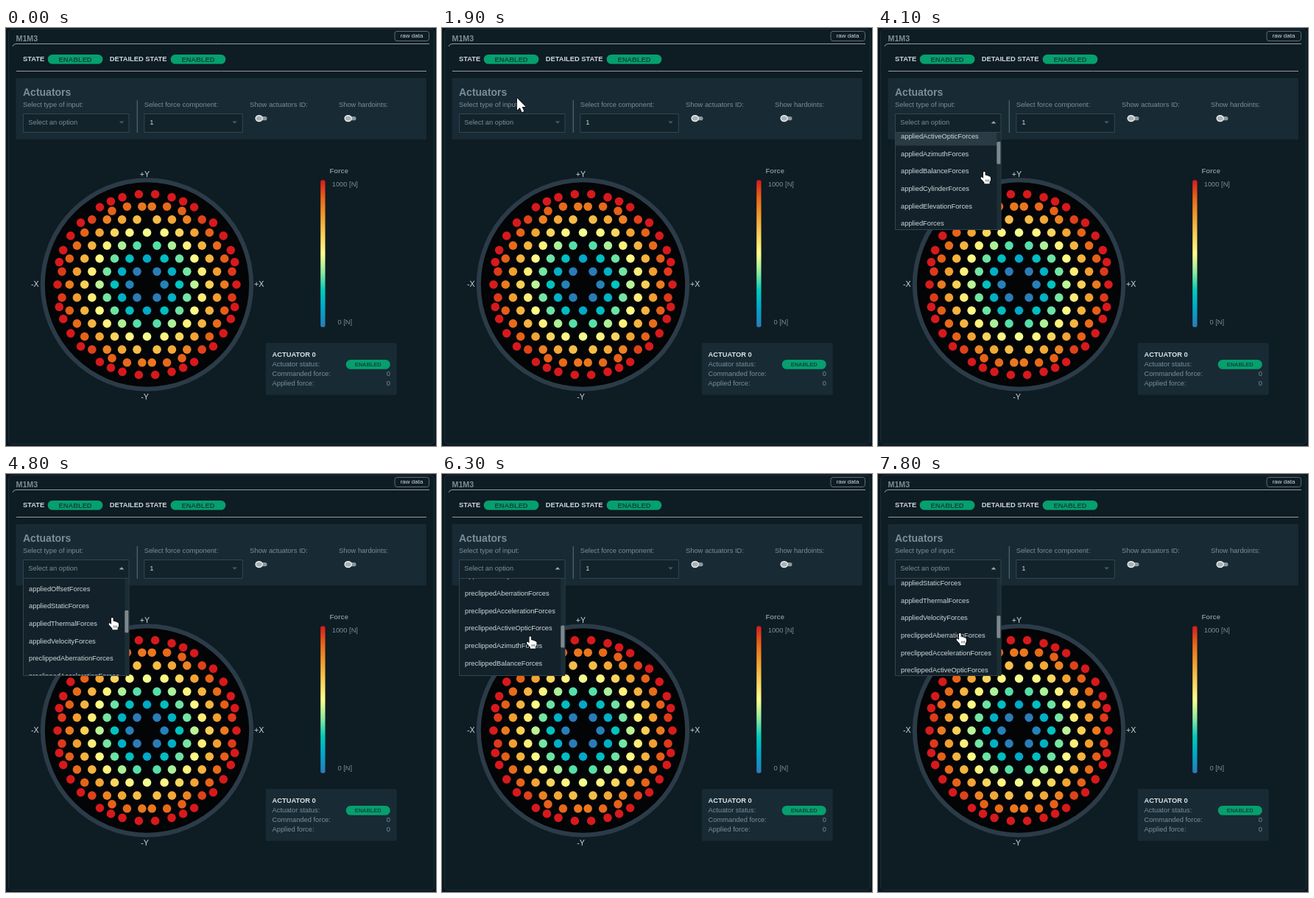
An HTML page with a canvas for the animation above (8 s loop, 584x567 px).

```html
<!DOCTYPE html>
<html lang="en">
<head>
<meta charset="utf-8">
<title>Actuators</title>
<style>
  html, body { margin: 0; width: 100%; height: 100%; overflow: hidden; background: #0b171e; }
  canvas { display: block; }
</style>
</head>
<body>
<canvas id="stage" width="584" height="567"></canvas>
<script>
const ctx = document.getElementById('stage').getContext('2d');
const LOOP = 8000, STEP = 100;
const OPEN_AT = 2400, HAND_AT = 2000, ARROW_AT = 500;
const FONT = '"Liberation Sans", Arial, sans-serif';
const GREY = '#7b8e98', LIGHT = '#ced7db', GREEN = '#05a06d';
const PANEL = '#182b35', FIELD = '#13232b', RULE = '#929ca1';
const SCALE = ['#2c7bb6', '#00a6ca', '#00ccbc', '#90eb9d', '#ffff8c',
               '#f9d057', '#f29e2e', '#e76818', '#d7191c'];

const LIST = { x: 23.5, y: 141.5, w: 143.5, h: 132, row: 23.67 };
const KINDS = ['Aberration', 'Acceleration', 'ActiveOptic', 'Azimuth', 'Balance', 'Cylinder',
               'Elevation', '', 'Offset', 'Static', 'Thermal', 'Velocity'];
const OPTIONS = ['applied', 'preclipped'].flatMap(p => KINDS.map(k => p + k + 'Forces'));

// Stops: arrival time, then values
const ARROW_STOPS = [[500, 458, 96], [1300, 177, 36], [1700, 91, 41], [1900, 102, 95]];
// x, y, highlighted row
const HAND_STOPS = [[2000, 112, 115, 0], [2200, 112, 127, 0], [3100, 134, 153, 0],
                    [3700, 139, 194, 2], [5600, 117, 206, 2], [6500, 112, 233, 17],
                    [6800, 109, 253, 18], [7500, 106, 215, 16]];
const SCROLL_STOPS = [[0, 0], [4100, 53], [4600, 153], [5000, 253.5], [6500, 317.6], [7800, 218]];

// Rest at each stop, then travel to arrive at the next one on time
function glide(stops, travel, t) {
  const next = stops.findIndex(s => s[0] > t);
  if (next < 0) return stops[stops.length - 1].slice(1);
  const a = stops[next - 1], b = stops[next];
  const from = Math.max(a[0], b[0] - travel);
  const k = Math.max(0, (t - from) / (b[0] - from));
  return a.slice(1).map((v, i) => v + (b[i + 1] - v) * k);
}

function text(str, x, y, color = GREY, size = 9.33, weight = 'normal', align = 'left') {
  ctx.font = `${weight} ${size}px ${FONT}`;
  ctx.textAlign = align;
  ctx.fillStyle = color;
  ctx.fillText(str, x, y);
}

function box(x, y, w, h, r, fill, stroke) {
  ctx.beginPath();
  ctx.roundRect(x, y, w, h, r);
  if (fill) { ctx.fillStyle = fill; ctx.fill(); }
  if (stroke) { ctx.strokeStyle = stroke; ctx.lineWidth = 1; ctx.stroke(); }
}

function oval(x, y, rx, ry, fill) {
  ctx.beginPath();
  ctx.ellipse(x, y, rx, ry, 0, 0, 2 * Math.PI);
  ctx.fillStyle = fill;
  ctx.fill();
}

function strokePath(d, color, width = 1) {
  ctx.strokeStyle = color;
  ctx.lineWidth = width;
  ctx.stroke(new Path2D(d));
}

function heat(f) {
  const p = Math.min(Math.max(f, 0), 1) * (SCALE.length - 1);
  const i = Math.min(Math.floor(p), SCALE.length - 2);
  const rgb = s => [1, 3, 5].map(n => parseInt(s.slice(n, n + 2), 16));
  const a = rgb(SCALE[i]), b = rgb(SCALE[i + 1]);
  return `rgb(${a.map((v, j) => Math.round(v + (b[j] - v) * (p - i)))})`;
}

// One quadrant: a staggered grid, a bent top row and an outer rim
function quadrant() {
  const dx = 20.4, dy = 17.63, limit = 117, points = [[121.5, 0], [0, 2 * dy], [0, 4 * dy]];
  for (let n = 0; n < 6; n++)
    for (let x = n % 2 ? 13.5 : 23.6; Math.hypot(x, n * dy) < limit; x += dx)
      points.push([x, n * dy]);
  for (let k = 0; k < 3; k++) {
    const x = 6.7 + k * dx;
    points.push([x, Math.min(6 * dy, Math.sqrt(110.6 ** 2 - x * x))]);
  }
  for (const deg of [14.3, 22.3, 32.5, 43, 58.6, 66.5, 74.2, 84.8]) {
    const a = deg * Math.PI / 180;
    points.push([123 * Math.cos(a), 123 * Math.sin(a)]);
  }
  return points;
}
const ACTUATORS = quadrant();

function mirror() {
  const cx = 191.5, cy = 348;
  oval(cx, cy, 144.7, 144.7, '#2b3b48');
  oval(cx, cy, 138.7, 138.7, '#020406');
  for (const [x, y] of ACTUATORS) {
    const color = heat((Math.hypot(x, y) - 22) / 100);
    for (const sx of x ? [-1, 1] : [1])
      for (const sy of y ? [-1, 1] : [1]) oval(cx + sx * x, cy + sy * y, 5.8, 5.8, color);
  }
  text('+Y', 188.5, 202, LIGHT, 10.67, 'normal', 'center');
  text('-Y', 188.5, 504, LIGHT, 10.67, 'normal', 'center');
  text('-X', 34, 351, LIGHT, 10.67);
  text('+X', 337, 351, LIGHT, 10.67);
}

function legend() {
  const g = ctx.createLinearGradient(0, 406, 0, 206);
  SCALE.forEach((c, i) => g.addColorStop(i / (SCALE.length - 1), c));
  box(427.2, 206.3, 6.3, 199.5, 2.5, g);
  text('Force', 439.5, 197, GREY, 9.33, 'bold');
  text('1000 [N]', 442.7, 215);
  text('0 [N]', 450.5, 402);
}

function badge(x, y, w, size) {
  box(x, y, w, 12.8, 6.4, GREEN);
  text('ENABLED', x + w / 2, y + 6.2 + size * 0.36, '#124540', size, 'bold', 'center');
}

function toggle(x) {
  box(x, 120, 15.5, 5.3, 2.6, '#8d979d');
  oval(x + 4.7, 122.6, 4.6, 3.9, '#a9b2b7');
  ctx.strokeStyle = '#edf0f1';
  ctx.lineWidth = 1.4;
  ctx.stroke();
}

function caret(x, up, color) {
  const s = up ? -1 : 1;
  ctx.fillStyle = color;
  ctx.fill(new Path2D(`M${x - 3.3} ${128 - 1.6 * s}h6.6l-3.3 ${3.4 * s}z`));
}

function header() {
  box(3.5, 1.5, 578, 563, 5, '#0e1c24', '#1c2e38');
  text('M1M3', 13.5, 18, GREY, 10.67, 'bold');
  strokePath('M9 25Q10 21.5 14 21.5H575', RULE);
  box(528, 4.5, 46.5, 13, 3, '#0e1c24', '#5f6e77');
  text('raw data', 551, 13, '#d5dcdf', 8, 'normal', 'center');
  text('STATE', 23, 45, LIGHT, 9.33, 'bold');
  badge(56.7, 36, 74.7, 9.33);
  text('DETAILED STATE', 140.7, 45, LIGHT, 9.33, 'bold');
  badge(223.6, 36, 74.7, 9.33);
  strokePath('M14 58.5H571', RULE);
}

function controls(open) {
  box(13.5, 68, 557.3, 83.3, 2, PANEL);
  text('Actuators', 23, 92, GREY, 14, 'bold');
  text('Select type of input:', 23, 107);
  text('Select force component:', 187.7, 107);
  text('Show actuators ID:', 331, 107);
  text('Show hardoints:', 452, 107);
  box(23.5, 116.5, 143.5, 25, 0, FIELD, '#34454f');
  box(187.8, 116.5, 133.5, 25, 0, FIELD, '#34454f');
  text('Select an option', 30.3, 131);
  text('1', 195.3, 131, LIGHT);
  caret(157, open, open ? '#a3adb2' : '#4b5a63');
  caret(310.5, false, '#4b5a63');
  strokePath('M178.3 98V142', '#52616a', 1.3);
  toggle(339);
  toggle(460);
}

function card() {
  box(352.7, 427.3, 178, 70.5, 2, PANEL);
  text('ACTUATOR 0', 361.5, 446, '#dbe2e5', 9.33, 'bold');
  badge(461.7, 450, 60, 7.45);
  ['Actuator status:', 'Commanded force:', 'Applied force:'].forEach((label, i) => {
    const y = 459 + 13 * i;
    text(label, 361.5, y);
    if (i) text('0', 522, y, GREY, 9.33, 'normal', 'right');
  });
}

function dropdown(t, active) {
  const { x, y, w, h, row } = LIST;
  const [scroll] = glide(SCROLL_STOPS, 300, t);
  const ratio = (h - 1) / (OPTIONS.length * row);
  ctx.save();
  if (t < OPEN_AT + STEP) {
    ctx.globalAlpha = 0.6;
    ctx.translate(0, y * 0.1);
    ctx.scale(1, 0.9);
  }
  box(x, y, w, h, 0, '#13222a', '#33444d');
  ctx.beginPath();
  ctx.rect(x + 0.5, y + 0.5, w - 1, h - 1);
  ctx.clip();
  OPTIONS.forEach((name, i) => {
    const top = y + i * row - scroll;
    if (i === active) {
      ctx.fillStyle = '#2a3b45';
      ctx.fillRect(x, top, w, row);
    }
    text(name, 31, Math.floor(top + 14.8), LIGHT);
  });
  ctx.fillStyle = '#1c2d36';
  ctx.fillRect(161.3, y, 6, h);
  box(161.3, y + 0.5 + scroll * ratio, 5.4, (h - 1) * ratio, 1.5, '#7d888e');
  ctx.restore();
}

const ARROW = new Path2D('M0 0V16.5L3.8 13L6.6 19.3L9.4 18L6.7 12H11.8Z');
const HAND = new Path2D('M4 1.5Q5.2 -.2 6.6 1.5V6Q8.2 5 9 6.5Q10.6 5.8 11.4 7.2' +
  'Q13.6 6.8 14 9V12.5L12.6 15V17.2H5.4V15.5L.6 10.3Q.2 8 2.2 8.3L4 10Z');

function pointer(shape, x, y) {
  ctx.save();
  ctx.translate(x, y);
  ctx.lineJoin = 'round';
  ctx.lineWidth = 1.6;
  ctx.strokeStyle = '#05090c';
  ctx.stroke(shape);
  ctx.fillStyle = '#fff';
  ctx.fill(shape);
  if (shape === HAND) strokePath('M7.6 11.5V14.5M9.6 11.5V14.5M11.5 11.5V14.5', '#30383d', 0.7);
  ctx.restore();
}

function draw(t) {
  const open = t >= OPEN_AT;
  ctx.fillStyle = '#0b171e';
  ctx.fillRect(0, 0, 584, 567);
  header();
  controls(open);
  mirror();
  legend();
  card();
  if (t >= HAND_AT) {
    const [x, y, row] = glide(HAND_STOPS, 400, t);
    if (open) dropdown(t, Math.round(row));
    pointer(HAND, x, y);
  } else if (t >= ARROW_AT) {
    pointer(ARROW, ...glide(ARROW_STOPS, 800, t));
  }
}

const start = performance.now();
function frame() {
  const t = (performance.now() - start) % LOOP;
  draw(Math.floor(t / STEP) * STEP);
  requestAnimationFrame(frame);
}
frame();
</script>
</body>
</html>
```
